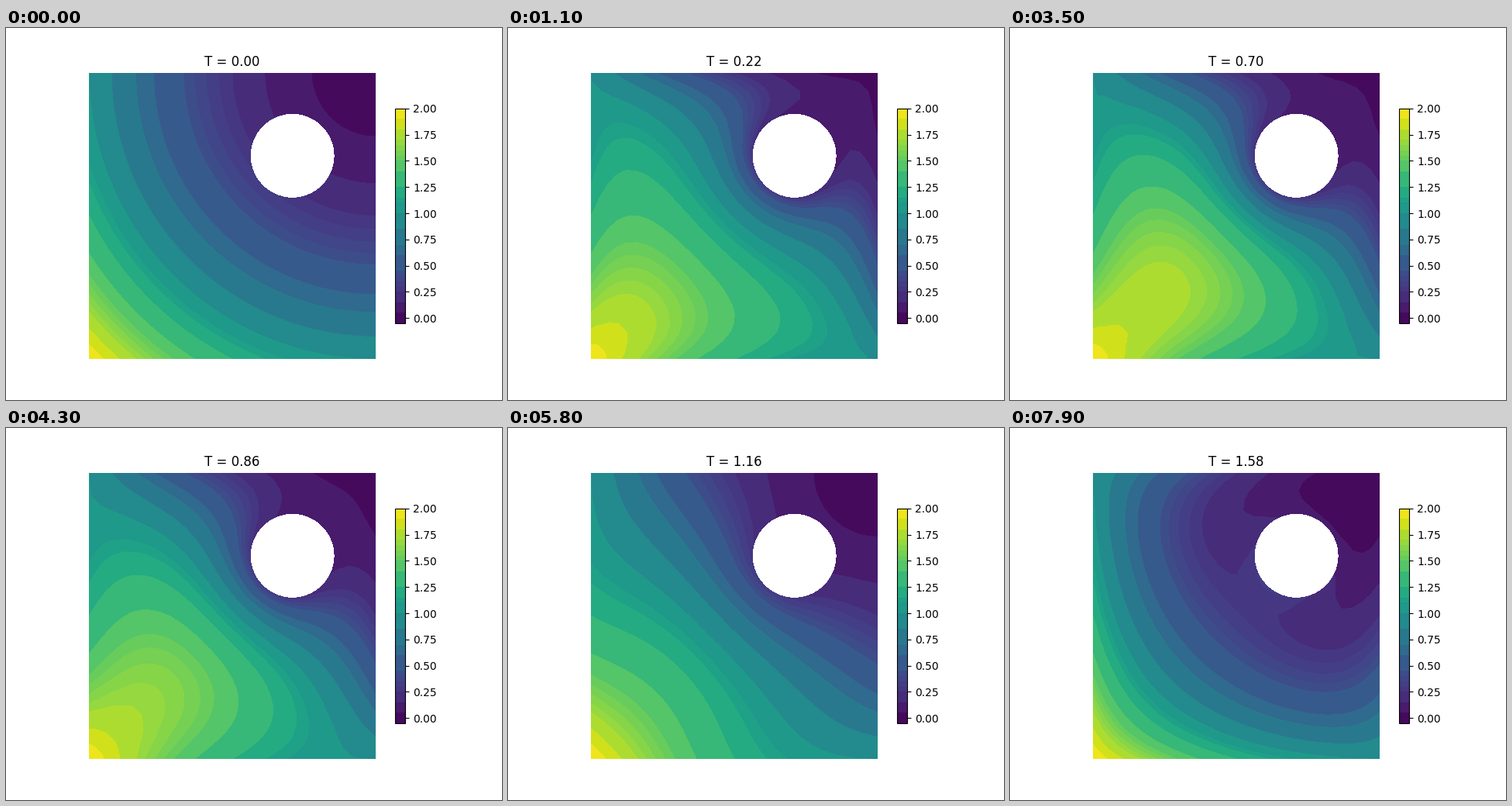
Recreate the animation shown at these times as a matplotlib script. Size 640x480 px, loop 8000 ms.

```python
import numpy as np
import matplotlib.pyplot as plt
from matplotlib.animation import FuncAnimation
from matplotlib.tri import Triangulation

FRAMES, INTERVAL, DT = 80, 100, 0.02
HOLE, RADIUS = 0.71, 0.1475
ALPHA, FORCE = 0.13, 2.6
LEVELS = [-0.05, 0.05, 0.15, 0.25, 0.3, 0.35, 0.4, 0.45, 0.6, 0.7, 0.85, 1.0,
          1.1, 1.15, 1.25, 1.4, 1.5, 1.55, 1.6, 1.65, 1.7, 1.8, 1.9, 2.0]


def ring(radius, n=56):
    a = np.arange(n) * 2 * np.pi / n
    return HOLE + radius * np.column_stack([np.cos(a), np.sin(a)])


def build_mesh(n=32):
    """Unit square with a round hole; returns triangulation and fixed nodes."""
    g = np.linspace(0, 1, n + 1)
    grid = np.array([(x, y) for x in g for y in g])
    grid = grid[np.hypot(*(grid - HOLE).T) > RADIUS + 0.04]
    pts = np.vstack([grid, ring(RADIUS), ring(RADIUS + 0.02)])
    dist = np.hypot(*(pts - HOLE).T)
    on_hole = dist < RADIUS + 1e-6
    on_side = (pts < 1e-9).any(axis=1) | (pts > 1 - 1e-9).any(axis=1)
    mesh = Triangulation(pts[:, 0], pts[:, 1])
    mesh.set_mask(on_hole[mesh.triangles].all(axis=1))
    return mesh, on_hole | on_side


def assemble(mesh):
    """Linear element stiffness matrix and lumped masses."""
    size = len(mesh.x)
    stiff, mass = np.zeros((size, size)), np.zeros(size)
    for tri in mesh.get_masked_triangles():
        x, y = mesh.x[tri], mesh.y[tri]
        b = np.roll(y, -1) - np.roll(y, 1)
        c = np.roll(x, 1) - np.roll(x, -1)
        area = abs(b[0] * c[1] - b[1] * c[0]) / 2
        if area < 1e-12:
            continue
        stiff[np.ix_(tri, tri)] += (np.outer(b, b) + np.outer(c, c)) / (4 * area)
        mass[tri] += area / 3
    return stiff, mass


def solve(mesh, fixed):
    """Forced heat equation, implicit steps, boundary held at its start value."""
    stiff, mass = assemble(mesh)
    free = ~fixed
    op = stiff[np.ix_(free, free)] / mass[free][:, None]
    step = np.linalg.inv(np.eye(free.sum()) + DT * ALPHA * op)
    base = (1 - mesh.x) ** 2 + (1 - mesh.y) ** 2
    w = np.zeros(free.sum())
    states = [base]
    for k in range(1, FRAMES):
        source = FORCE * np.cos(np.pi * k * DT / 2)
        w = step @ (w + DT * (4 * ALPHA + source))
        u = base.copy()
        u[free] += w
        states.append(u)
    return np.clip(states, -0.049, 2)


mesh, fixed = build_mesh()
states = solve(mesh, fixed)

fig, ax = plt.subplots(figsize=(6.4, 4.8), dpi=100)


def contour(k):
    return ax.tricontourf(mesh, states[k], levels=LEVELS, cmap="viridis")


plot = contour(0)
fig.colorbar(plot, ax=ax, shrink=0.75, spacing="proportional",
             ticks=np.arange(0, 2.01, 0.25), format="%.2f")


def draw(k):
    ax.clear()
    ax.set_aspect("equal")
    ax.axis("off")
    contour(k)
    ax.set_xlim(0, 1)
    ax.set_ylim(0, 1)
    ax.set_title(f"T = {k * DT:.2f}")
    return []


anim = FuncAnimation(fig, draw, frames=FRAMES, interval=INTERVAL, repeat=True,
                     repeat_delay=0, blit=False)
plt.show()
```
